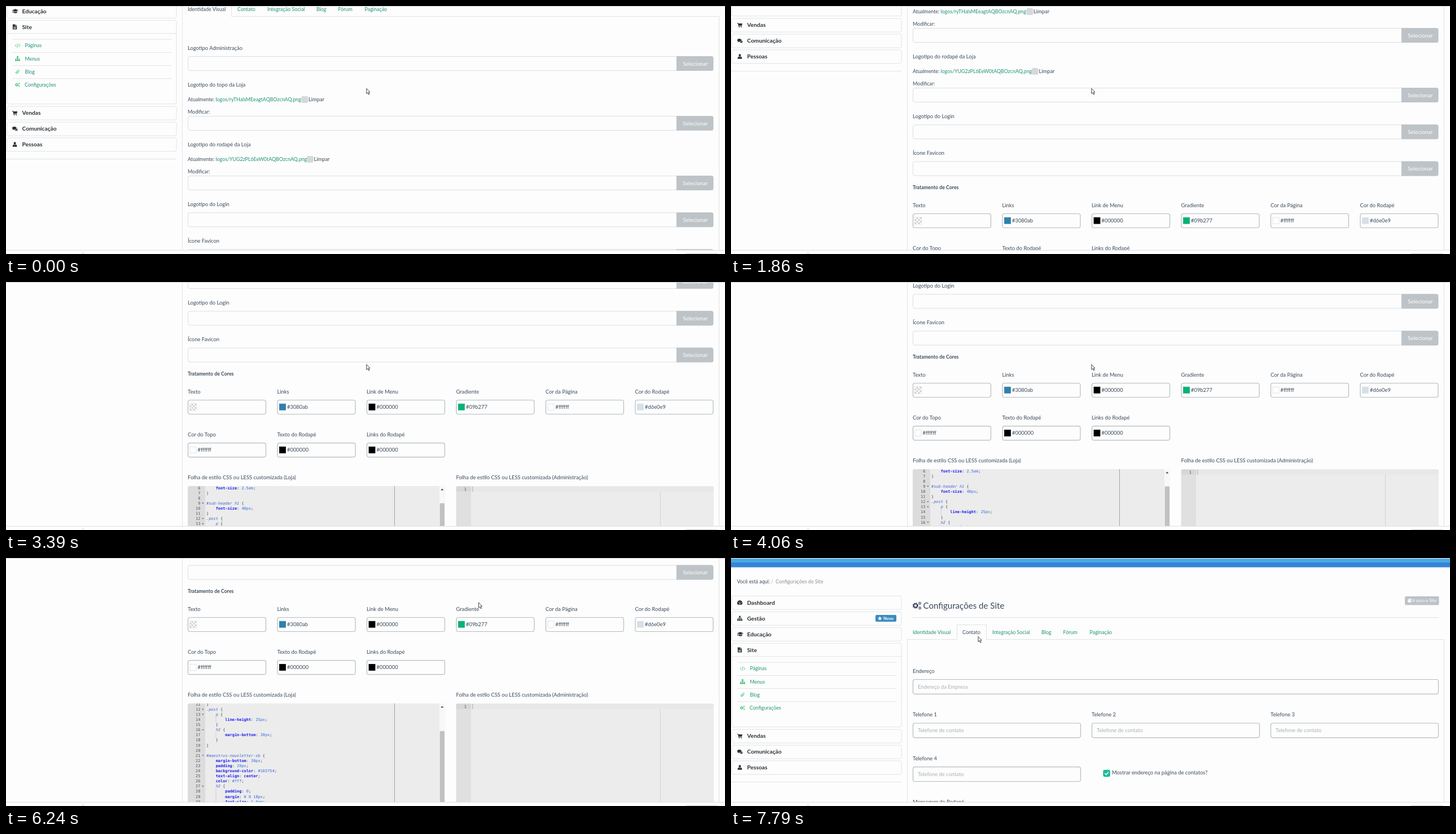
Write an HTML page that moves like this. It is 1274 px wide and 440 px high and loops after 8000 ms.

```html
<!DOCTYPE html>
<html lang="pt">
<head>
<meta charset="utf-8">
<title>Configurações de Site</title>
<style>
  html, body { margin: 0; width: 100%; height: 100%; overflow: hidden; background: #fdfdfd; }
  svg { display: block; }
  text { font-family: Lato, sans-serif; white-space: pre; }
  .code text { font: 6.92px "DejaVu Sans Mono", monospace; fill: #444; }
  .code .sel { font-style: italic; fill: #4467cf; }
  .code .key { font-weight: 700; fill: #1d1df0; }
  .code .val { fill: #2f6ae6; }
  .code .num { fill: #555; text-anchor: end; }
</style>
</head>
<body>
<svg id="stage" width="1274" height="440" viewBox="0 0 1274 440"></svg>
<script>
const PAGE = '#fdfdfd', INK = '#3b4a5c', DARK = '#2b3035', GREEN = '#1f9275',
      LIME = '#2fbf6b', LINE = '#dfe3e5', BUTTON = '#bdc3c7';

const label = (x, y, s, size = 9.4, fill = INK, attrs = '') =>
  `<text x="${x}" y="${y + size * .36}" font-size="${size}" fill="${fill}" ${attrs}>${s}</text>`;
const box = (x, y, w, h, fill, stroke = 'none', r = 0, sw = 1) =>
  `<rect x="${x}" y="${y}" width="${w}" height="${h}" rx="${r}" fill="${fill}" stroke="${stroke}" stroke-width="${sw}"/>`;
const line = (d, stroke = LINE, w = 1, attrs = '') =>
  `<path d="${d}" fill="none" stroke="${stroke}" stroke-width="${w}" ${attrs}/>`;

// Icons are drawn in a 10 unit box
const SHAPES = {
  gauge: 'M1 9A5 5 0 1 1 9 9zM4.4 5h1.2v2.6h-1.2zM1.5 5h1.2v1.2h-1.2zM7.3 5h1.2v1.2h-1.2zM4.4 2h1.2v1.2h-1.2z',
  tree: 'M3.5 .5h3v3h-1v1H9V7h1v2.5H7V7h1V5.5H5.5V7h1v2.5h-3V7h1V5.5H2V7h1v2.5H0V7h1V4.5h3.5v-1h-1z',
  cap: 'M0 3.5L6 1l6 2.5L6 6zM2.5 5.3L6 6.9l3.5-1.6V8Q6 10 2.5 8zM.6 4v4.5h.9V4.4z',
  file: 'M1 0h4.5v3.2H9V10H1zM6.2 0L9 2.5H6.2zM2.5 4.6h5v.8h-5zM2.5 6.2h5v.8h-5zM2.5 7.8h5v.8h-5z',
  cart: 'M0 1h2l.4 1H10L9 6H3.2l.2.8H9v1H2.6L1.4 2H0zM3 9a.8.8 0 1 0 1.6 0a.8.8 0 1 0-1.6 0M7.4 9a.8.8 0 1 0 1.6 0a.8.8 0 1 0-1.6 0',
  chat: 'M0 3.8a4.2 3 0 1 1 3.4 2.9L1 7.8l.6-1.6A4 3 0 0 1 0 3.8zM9.2 4.2q2 1.4.6 3.2l.7 1.6-2.1-.6Q6 9 4.5 7.6 8.8 7 9.2 4.2z',
  user: 'M2.8 2.8a2.2 2.5 0 1 1 4.4 0a2.2 2.5 0 1 1-4.4 0M.8 9.6Q.5 5.6 3 5.2Q5 6.8 7 5.2Q9.5 5.6 9.2 9.6z',
  star: 'M5 0l1.5 3.3 3.5.4-2.6 2.4.7 3.6L5 7.9 1.9 9.7l.7-3.6L0 3.7l3.5-.4z',
  globe: 'M0 5a5 5 0 1 1 10 0a5 5 0 1 1-10 0M2 3l2-1.5 1 1.5-2 2zM5.5 5.5l2-1 .8 1.5-2 2z'
};
const ring = (cx, cy, r, color) =>
  `<g fill="none" stroke="${color}"><circle cx="${cx}" cy="${cy}" r="${r}" stroke-width="${r * .65}"/>` +
  `<circle cx="${cx}" cy="${cy}" r="${r * 1.4}" stroke-width="${r * .5}" stroke-dasharray="${r * .55}"/></g>`;
const STROKES = {
  code: c => line('M3 2.2L.4 5 3 7.8M7.4 2.2L10 5 7.4 7.8M6 1.2L4.4 8.8', c, .9),
  clip: c => line('M7.5 4.8L4.6 8.2Q2.6 9.8 1.4 7.6Q1 6.6 2 5.6L5.6 1.8Q7.4.6 8.3 2.4Q8.5 3.3 7.6 4.2L4.4 7.2Q3.2 7.4 3.6 6.2L6 3.6', c, .9),
  cogs: c => ring(3.4, 5, 2, c) + ring(8.2, 2.4, 1, c) + ring(8.2, 7.8, 1, c)
};
const icon = (name, x, y, size, color) =>
  `<g transform="translate(${x} ${y - size / 2}) scale(${size / 10})">` +
  (STROKES[name] ? STROKES[name](color) : `<path d="${SHAPES[name]}" fill="${color}" fill-rule="evenodd"/>`) + '</g>';

function sidebar() {
  const heads = [['gauge', 'Dashboard', 79], ['tree', 'Gestão', 107], ['cap', 'Educação', 135], ['file', 'Site', 163],
    ['cart', 'Vendas', 315.8], ['chat', 'Comunicação', 343.8], ['user', 'Pessoas', 371.6]];
  const subs = [['code', 'Páginas'], ['tree', 'Menus'], ['clip', 'Blog'], ['cogs', 'Configurações']];
  return heads.map(([pic, name, y]) =>
      box(1.5, y - 11.7, 300.5, name === 'Site' ? 148.5 : 24, PAGE, LINE, 3) +
      icon(pic, 11, y, 9.2, DARK) + label(28.5, y, name, 10.2, DARK, 'font-weight="700"')).join('') +
    line('M1 174.8H302') +
    subs.map(([pic, name], i) => {
      const y = 196.2 + i * 23.2;
      return line(`M11 ${y - 11}H293`) + icon(pic, 16, y, 9, LIME) + label(name === 'Blog' || name === 'Menus' || name === 'Páginas' ? 33.5 : 33, y, name, 8.9, GREEN);
    }).join('') +
    box(256, 101, 37, 12, '#3a8bbd', 'none', 2) + icon('star', 260, 107, 7.4, '#fff') +
    label(270, 107, 'Novo', 7.4, '#fff', 'font-weight="700"') + line('M0 397.5H302');
}

function header() {
  return box(0, -60, 1274, 68, '#48aae1') + box(0, 8, 1274, 8.5, '#3784d8') +
    label(10.5, 42, 'Você está aqui:', 8.85) + label(71, 42, '/', 8.85, '#aaa') +
    label(79, 42, 'Configurações de Site', 8.85, '#8a8f94') +
    icon('cogs', 321.5, 84.5, 16, INK) + label(340.5, 84.5, 'Configurações de Site', 15.1) +
    box(1194, 68, 60.5, 15.5, BUTTON, 'none', 2) + icon('globe', 1199, 75.5, 7, '#fff') +
    label(1207.5, 75.5, 'Ir para o Site', 7.75, '#fff') + line('M322 105.5H1254');
}

function tabs(active) {
  const names = [[322, 'Identidade Visual'], [410, 'Contato'], [463, 'Integração Social'], [550, 'Blog'], [588.5, 'Fórum'], [635.5, 'Paginação']];
  const [a, b] = active ? [400.5, 452.5] : [312.5, 399.5];
  return line(`M312.5 1300V144.5H${a}V118.5H${b}V144.5H1263.5V1300`) +
    names.map(([x, s], i) => label(x, 131.5, s, 8.95, i === active ? INK : GREEN)).join('');
}

const picker = y => box(322.5, y + .5, 930, 25, PAGE, '#d9dee1', 3.5) +
  `<path d="M1188 ${y}h62a3.5 3.5 0 0 1 3.5 3.5v19a3.5 3.5 0 0 1-3.5 3.5h-62z" fill="${BUTTON}"/>` +
  label(1199.3, y + 13, 'Selecionar', 9.75, '#fff');

const current = (y, file, x) =>
  label(322, y, `Atualmente: <tspan fill="${GREEN}">${file}</tspan>`, 8.87) +
  box(x, y - 5.5, 12, 12, '#d7d8d9', 'none', 3) + label(x + 12.7, y, 'Limpar') +
  label(322, y + 22, 'Modificar:', 8.9);

const field = (x, y, w, h = 25) => box(x + .5, y + .5, w - 1, h, PAGE, '#b4bcc0', 3.5, 1.2);

function swatch(col, y, name, value) {
  const x = 322 + col * 158.5;
  const chip = value ? box(x + 4, y + 7.2, 11, 11, value, value === '#ffffff' ? '#ddd' : value, 0, .8)
    : box(x + 3.5, y + 7, 12, 12, '#fff', '#ddd', 0, .8) + [...Array(16).keys()].filter(i => (i + (i >> 2)) % 2)
      .map(i => box(x + 3.5 + i % 4 * 3, y + 7 + (i >> 2) * 3, 3, 3, '#d2d2d2')).join('');
  return label(x, y - 14.5, name) + field(x, y, 139) + chip + label(x + 17.5, y + 12.7, value);
}

const CODE = `    font-size: 2.5em;
}

#sub-header h1 {
    font-size: 40px;
}
.post {
    p {
        line-height: 25px;
    }
    h2 {
        margin-bottom: 20px;
    }
}

#maestrus-newsletter-sb {
    margin-bottom: 30px;
    padding: 20px;
    background-color: #103754;
    text-align: center;
    color: #fff;
    h2 {
        padding: 0;
        margin: 0 0 10px;
        font-size: 1.6em;
    }
    input, button {
        border: 2px solid #003B5A;
    }
    input {
        padding: 10px;
    }
    button {
        color: #fff;
        padding: 10px;
    }
}

.post {
    margin: 0 0 20px;
}`.split('\n');

function codeLine(src, i) {
  const n = i + 6, y = 5.5 + (n - 1) * 9.1, base = y + 2.4;
  const body = src.trim(), indent = src.length - src.trimStart().length;
  const span = (cls, s) => `<tspan class="${cls}">${s}</tspan>`;
  let html = body;
  if (body.endsWith('{')) html = span('sel', body.slice(0, -1)) + '{';
  else if (body.includes(':')) {
    const [prop, value] = body.slice(0, -1).split(': ');
    html = span('key', prop) + ': ' + value.split(' ')
      .map(v => span(/^[a-z]/.test(v) ? 'key' : 'val', v)).join(' ') + ';';
  }
  return `<text class="num" x="22.3" y="${base}">${n}</text><text x="${33 + indent * 4.166}" y="${base}">${html}</text>` +
    (body.endsWith('{') ? `<path d="M25.2 ${y - 1}h3.4l-1.7 2.2z" fill="#666"/>` : '') +
    (indent > 4 ? line(`M50 ${y - 4.5}v9.1`, '#aaa', .8, 'stroke-dasharray="1 1"') : '');
}

function editors() {
  return `<svg class="code" x="322" y="803" width="456" height="430">` +
    box(0, 0, 456, 440, '#ececec', 'none', 4) + box(0, 0, 31, 440, '#dcdcdc', 'none', 4) +
    line('M366.5 0V430', '#a2a2a2') + `<g id="lines">${CODE.map(codeLine).join('')}</g>` +
    box(446, 0, 10, 430, '#f8f8f8') + '<path d="M448.3 7.5h5l-2.5-3z" fill="#444"/>' +
    `<rect id="thumb" x="446.7" width="8.3" height="155" fill="#c1c1c1"/></svg>` +
    `<svg class="code" x="797.5" y="803" width="456.5" height="430">` +
    box(0, 0, 456.5, 440, '#ececec', 'none', 4) + box(0, 0, 26.5, 440, '#e0e0e0', 'none', 4) +
    box(0, 1, 26.5, 9, '#d7d7d7') + box(26.5, 1, 430, 9, '#e8e8e8') + line('M362 10V430', '#d3d3d3') +
    '<text class="num" x="18.5" y="8">1</text>' + line('M29.3 1V10', '#aaa') + '</svg>';
}

function visualPane() {
  const row1 = [['Texto', ''], ['Links', '#3080ab'], ['Link de Menu', '#000000'], ['Gradiente', '#09b277'], ['Cor da Página', '#ffffff'], ['Cor do Rodapé', '#d6e0e9']];
  const row2 = [['Cor do Topo', '#ffffff'], ['Texto do Rodapé', '#000000'], ['Links do Rodapé', '#000000']];
  return tabs(0) +
    label(322, 200.3, 'Logotipo Administração') + picker(215) +
    label(322, 266, 'Logotipo do topo da Loja') + current(291.5, 'logos/ryTHalsMEeagtAQBOzcnAQ.png', 523.3) + picker(321) +
    label(322, 371.5, 'Logotipo do rodapé da Loja') + current(397.5, 'logos/YUG2zPL6EeW0tAQBOzcnAQ.png', 532.7) + picker(427) +
    label(322, 477.7, 'Logotipo do Login') + picker(492.3) +
    label(322, 542.8, 'Ícone Favicon') + picker(557.5) +
    label(322, 604, 'Tratamento de Cores', 8.8, INK, 'font-weight="700"') +
    row1.map(([n, v], i) => swatch(i, 650, n, v)).join('') +
    row2.map(([n, v], i) => swatch(i, 726.2, n, v)).join('') +
    label(322, 788, 'Folha de estilo CSS ou LESS customizada (Loja)') +
    label(797.5, 788, 'Folha de estilo CSS ou LESS customizada (Administração)') + editors();
}

function contactPane() {
  const input = (x, y, w, name, hint) => label(x, y - 14.7, name) + field(x, y, w, 25.8) + label(x + 9, y + 13.2, hint, 9.4, '#aab0b5');
  const phones = [[322, 292.5], [639, 292.5], [956, 292.5], [322, 370.2]];
  return input(322, 215, 932, 'Endereço', 'Endereço da Empresa') +
    phones.map(([x, y], i) => input(x, y, 298, `Telefone ${i + 1}`, 'Telefone de contato')).join('') +
    box(659.3, 375.8, 12.5, 12.5, '#1abc9c', 'none', 3) + line('M662.3 382l2.4 2.5 4.2-4.8', '#fff', 1.6) +
    label(675, 381, 'Mostrar endereço na página de contatos?') + label(322, 433, 'Mensagem de Rodapé');
}

const stage = document.getElementById('stage');
stage.innerHTML = box(0, 0, 1274, 440, PAGE) +
  `<g id="doc">${header()}${sidebar()}<g id="visual">${visualPane()}</g>` +
  `<g id="contact">${tabs(1)}<g id="form">${contactPane()}</g></g></g>` +
  box(0, 0, 1274, 1.2, '#d6d8d9') + box(0, 433, 1274, 7, '#fefefe') + line('M0 433.3H1274', '#dcdedf') +
  line('M136.5 437V440', '#ccc') + line('M1205 439.5H1261', '#ccc') +
  '<path id="cursor" d="M0 0V9.2L2.1 7.3L3.7 10.8L5.2 10.1L3.6 6.7H6.2Z" fill="#fff" stroke="#333" stroke-width=".9"/>';

// Each track holds its value until the next time: [ms, value...]
const SCROLL = [[0, 126], [560, 156], [710, 189], [1140, 219], [1290, 252], [1860, 282], [1990, 315],
  [2530, 330], [2670, 366], [2810, 378], [3240, 411], [3390, 441], [3920, 471], [4100, 534], [4280, 597], [4460, 630],
  [4730, 634], [4850, 693], [6100, 640], [6240, 545], [6360, 441], [6500, 315], [6650, 189], [6790, 126],
  [6940, 95], [7080, 40], [7220, 0]];
const CODE_SCROLL = [[0, 47.7], [4990, 71], [5120, 95.1]];
const POINTER = [[0, 638.8, 146.3], [5830, 720, 118], [5970, 800, 92], [6100, 837.5, 79],
  [7080, 760, 95], [7220, 560, 130], [7360, 438, 139.3]];
const FORM = [[0, 0], [7670, .5], [7790, 1]];

const at = (track, t) => track.findLast(step => step[0] <= t).slice(1);
const $ = id => document.getElementById(id);

function draw(now) {
  const t = now % 8000;
  const [code] = at(CODE_SCROLL, t), [form] = at(FORM, t);
  $('doc').setAttribute('transform', `translate(0 ${-at(SCROLL, t)[0]})`);
  $('lines').setAttribute('transform', `translate(0 ${-code})`);
  $('thumb').setAttribute('y', 12 + .39 * code);
  $('cursor').setAttribute('transform', `translate(${at(POINTER, t)})`);
  $('visual').style.display = form ? 'none' : '';
  $('contact').style.display = form ? '' : 'none';
  $('form').style.opacity = form;
  requestAnimationFrame(draw);
}
draw(0);
</script>
</body>
</html>
```
